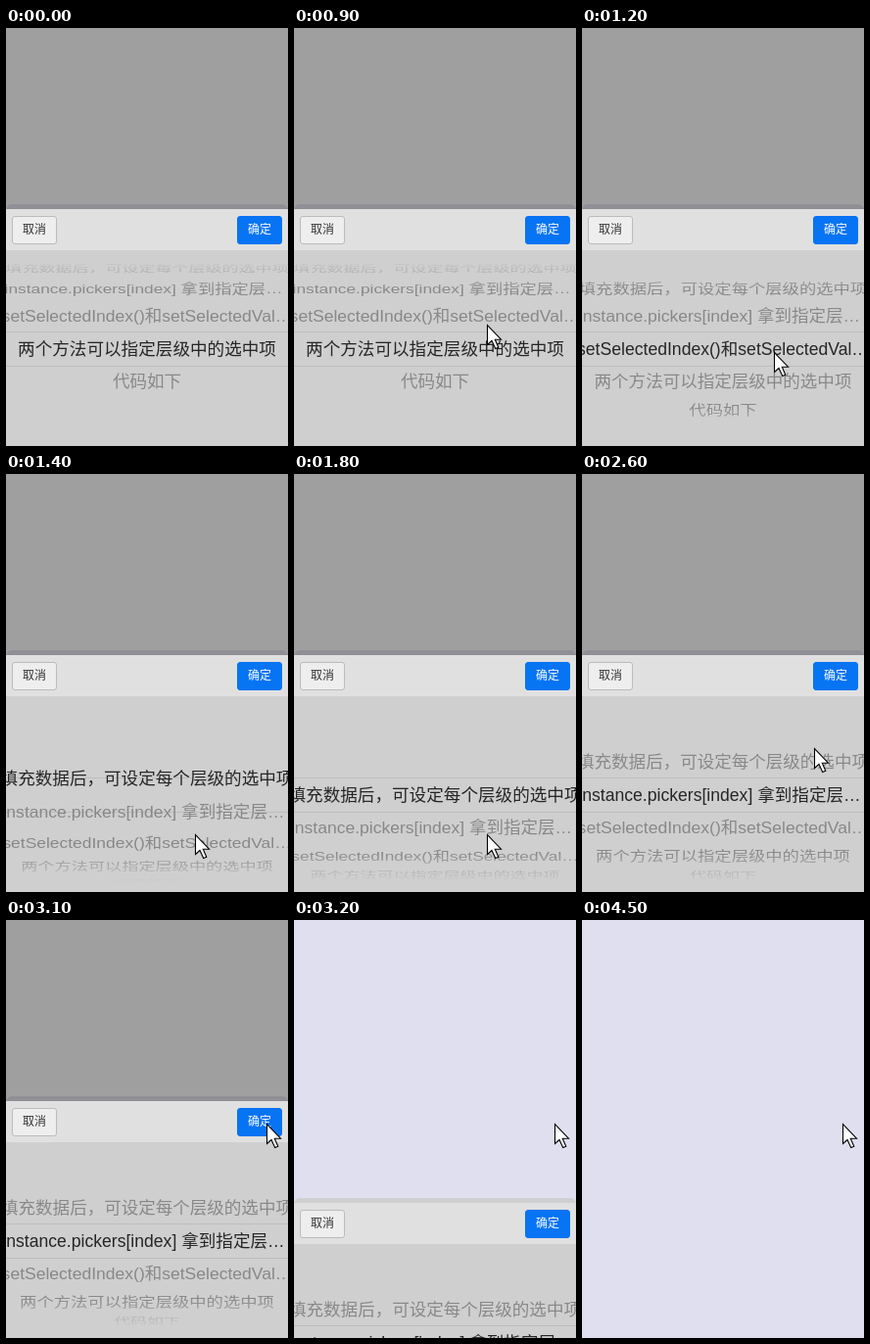
An HTML page that plays this animation: 288x427 px, repeating every 4.6 s.

```html
<!DOCTYPE html>
<html lang="zh-CN">
<head>
<meta charset="utf-8">
<title>Wheel picker</title>
<style>
  html, body { margin: 0; width: 100%; height: 100%; overflow: hidden; background: #e0dff0; }
  #stage { position: relative; width: 288px; height: 427px; overflow: hidden;
    font-family: "Liberation Sans", "Noto Sans CJK SC", "Noto Sans CJK", sans-serif; }
  #stage div, #cursor { position: absolute; }
  #shade { inset: 0; background: #9f9f9f; }
  #panel { left: 0; top: 180px; width: 288px; height: 247px; }
  #edge { width: 288px; height: 14px; border-radius: 6px 6px 0 0; background: #918f95; }
  #panel.leaving #edge { background: #cecfd1; }
  #bar { top: 5px; width: 288px; height: 42px; background: #e0e0e0; }
  .btn { top: 7px; width: 46px; height: 29px; box-sizing: border-box; border: 1px solid #bbb;
    border-radius: 3px; background: #eee; color: #333; font-size: 12px; line-height: 27px; text-align: center; }
  #cancel { left: 6px; }
  #ok { left: 236px; border-color: #0672f0; background: #0774f4; color: #fff; font-weight: 500; }
  #well { top: 47px; width: 288px; height: 200px; background: #cfcfcf; overflow: hidden; }
  .rule { width: 288px; height: 1px; background: #bdbdbd; }
  #wheel { inset: 0; -webkit-mask-image: linear-gradient(transparent 5%, #000 20%, #000 80%, transparent 95%);
    mask-image: linear-gradient(transparent 5%, #000 20%, #000 80%, transparent 95%); }
  .row { left: -26px; top: 83px; width: 340px; height: 36px; line-height: 36px; font-size: 17.6px;
    text-align: center; white-space: nowrap; color: #888; }
  .row.on { color: #262626; }
  #cursor { left: 0; top: 0; width: 18px; height: 28px; overflow: visible; }
</style>
</head>
<body>
<div id="stage">
  <div id="shade"></div>
  <div id="panel">
    <div id="edge"></div>
    <div id="bar">
      <div class="btn" id="cancel">取消</div>
      <div class="btn" id="ok">确定</div>
    </div>
    <div id="well">
      <div class="rule" style="top:83px"></div>
      <div class="rule" style="top:118px"></div>
      <div id="wheel"></div>
    </div>
  </div>
  <svg id="cursor" viewBox="0 0 18 28">
    <path d="M.5 .5V20.5L5 16.5L8.7 24.5L11.8 23.2L8.3 15.2H14.5Z" fill="#fff" stroke="#000" stroke-width="1.1"/>
  </svg>
</div>
<script>
const LOOP = 4600, RADIUS = 100, DEPTH = 1400, ANGLE = 19.5 * Math.PI / 180;
const LEAVE = 3200, GONE = 4500;

const labels = [
  '填充数据后，可设定每个层级的选中项',
  'instance.pickers[index] 拿到指定层…',
  'setSelectedIndex()和setSelectedVal…',
  '两个方法可以指定层级中的选中项',
  '代码如下'
];

// time, pointer x, pointer y, wheel position in rows
const steps = [
  [0, 300, 268, 3], [400, 275, 268, 3],
  [600, 256, 275, 3], [700, 228, 288, 3], [800, 206, 299, 3], [900, 197, 303, 3],
  [1100, 197, 313, 2.65], [1200, 196, 331, 2], [1300, 194, 352, 1.2], [1400, 193, 368, 0.49],
  [1500, 193, 370, 0.34], [1600, 194, 370, 0.22], [1700, 195, 369, 0.08], [1800, 197, 368, 0],
  [2100, 198, 349, 0.55], [2200, 200, 326, 1.2], [2300, 200, 324, 1.14], [2400, 201, 322, 1.05],
  [2600, 237, 280, 1], [2700, 250, 255, 1], [2800, 258, 236, 1], [2900, 263, 222, 1],
  [3000, 265, 212, 1], [3100, 266, 208, 1]
];

const $ = id => document.getElementById(id);
const shade = $('shade'), panel = $('panel'), cursor = $('cursor');

const rows = labels.map(text => {
  const row = document.createElement('div');
  row.className = 'row';
  row.textContent = text;
  $('wheel').append(row);
  return row;
});

function turn(pos) {
  rows.forEach((row, i) => {
    const a = (i - pos) * ANGLE;
    const k = DEPTH / (DEPTH + RADIUS * (1 - Math.cos(a)));
    const shift = i === 1 ? -3.5 * k : 0;
    row.style.visibility = Math.abs(a) < Math.PI / 2 ? 'visible' : 'hidden';
    row.style.transform =
      `translate(${shift}px, ${RADIUS * Math.sin(a) * k}px) scale(${k}, ${k * Math.cos(a)})`;
    row.classList.toggle('on', i === Math.round(pos));
  });
}

function draw(t) {
  const [, x, y, pos] = steps.findLast(s => s[0] <= t);
  turn(pos);
  cursor.style.transform = `translate(${x}px, ${y}px)`;
  const leaving = t >= LEAVE;
  shade.style.display = leaving ? 'none' : '';
  panel.classList.toggle('leaving', leaving);
  panel.style.transform = `translateY(${leaving ? 104 : 0}px)`;
  panel.style.display = t >= GONE ? 'none' : '';
}

const start = performance.now();
function tick() {
  draw((performance.now() - start) % LOOP);
  requestAnimationFrame(tick);
}
tick();
</script>
</body>
</html>
```
